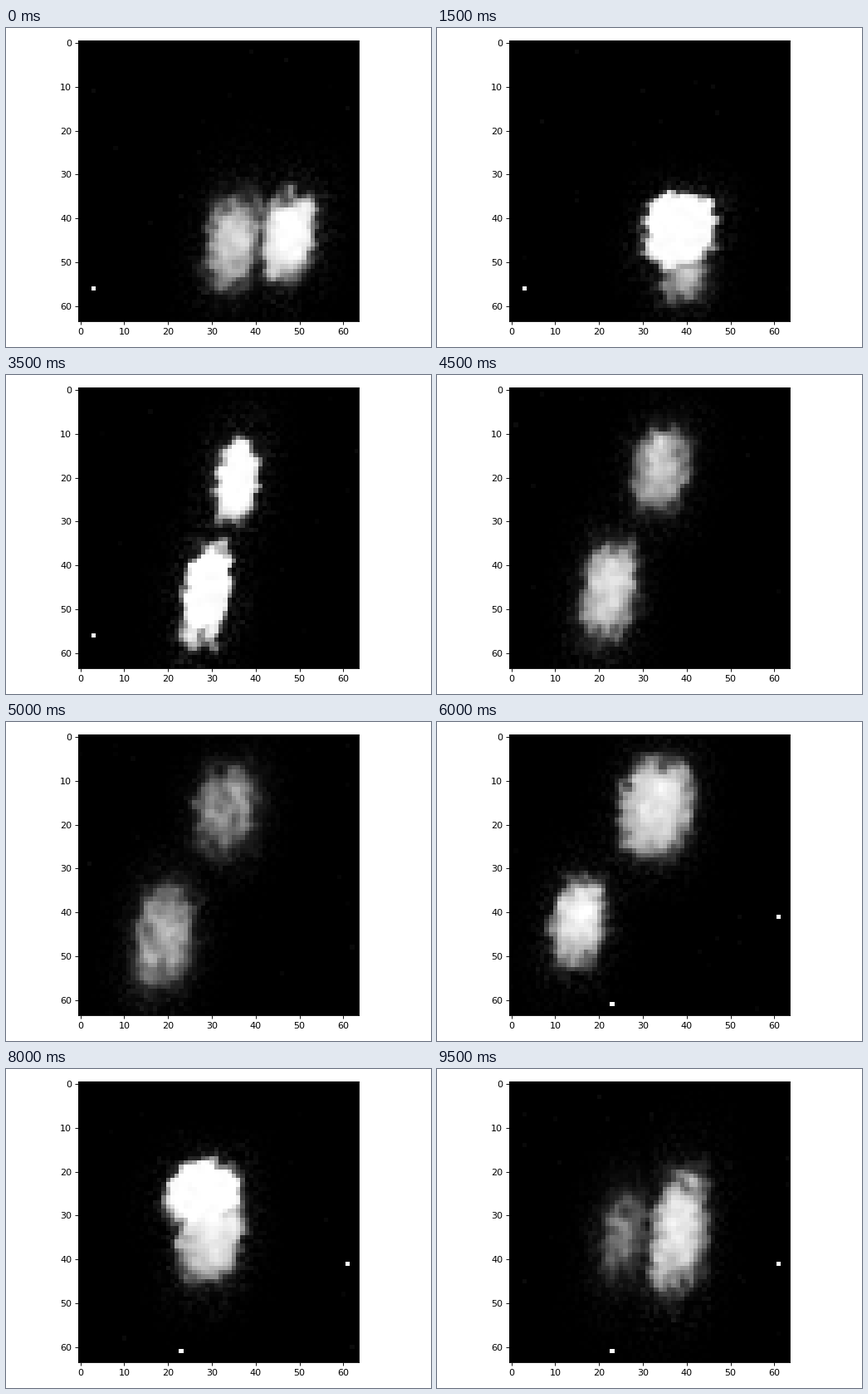
Recreate the animation shown at these times as a matplotlib script. Size 512 by 384 pixels, loop 10000 ms.

```python
import numpy as np
import matplotlib.pyplot as plt
from matplotlib.animation import FuncAnimation

N, FRAMES, INTERVAL, DPI = 64, 20, 500, 80
SLANT = .12
ROWS, COLS = np.mgrid[0:N, 0:N].astype(float)

# Key poses of the two drifting glyphs: x, y, radius x, radius y, level
KEYS = [0, 3, 7, 10, 12, 16, 19]
UPPER = np.array([(35, 45.5, 5.5, 10, .78), (38.5, 43, 8.2, 8.7, 1.15), (35.5, 21, 4.8, 9, 1.12),
                  (33.5, 17, 6.5, 9, .52), (33, 16.5, 8, 11, .84), (28, 25.5, 8.5, 8, 1.1),
                  (25.5, 35, 4.5, 8.5, .45)])
LOWER = np.array([(47.5, 44.5, 6.3, 10, .95), (39.5, 54, 5, 5, .65), (28.7, 47, 5.2, 11, 1.15),
                  (19, 46, 6.3, 11, .62), (15.5, 42.5, 6, 9.5, .88), (30, 35, 7, 10.5, .88),
                  (38, 34.5, 6.3, 13, .82)])

# Lit single cells: row, column, first frame, last frame
DOTS = [(56, 3, 0, 8), (61, 23, 11, 19), (41, 61, 11, 19)]


def smooth_noise(rng):
    """Unit-variance noise that varies over about two cells."""
    noise = rng.normal(size=(N, N))
    for axis in (0, 1):
        noise = (2 * noise + np.roll(noise, 1, axis) + np.roll(noise, -1, axis)) / 4
    return noise / noise.std()


def glyph(poses, frame, wobble):
    """Return a soft slanted blob and the wide halo around it."""
    x, y, rx, ry, level = (np.interp(frame, KEYS, column) for column in poses.T)
    dy = (ROWS - y) / ry
    dx = (COLS - x + SLANT * (ROWS - y)) / rx
    radius = (np.abs(dx) ** 2.5 + np.abs(dy) ** 2.5) ** .4
    distance = (radius - 1) * min(rx, ry) + .5 * wobble
    width = .6 + 1.2 * (1 - level)
    body, halo = (1 / (1 + np.exp(np.clip(distance / w, -40, 40))) for w in (width, 2.2))
    shade = 1.08 - .2 * np.minimum(radius, 1.3) ** 2 - .13 * np.clip(dy, -1.3, 1.3)
    return level * shade * body, halo


def picture(frame):
    rng = np.random.default_rng(40 + frame)
    wobble, grain = smooth_noise(rng), smooth_noise(rng)
    (upper, halo_a), (lower, halo_b) = (glyph(p, frame, wobble) for p in (UPPER, LOWER))
    img = np.clip(np.maximum(upper, lower), 0, 1)
    img *= 1 + .22 * (1.05 - img) * grain
    img = np.maximum(img, .4 * np.maximum(halo_a, halo_b) * rng.random((N, N)) ** 2)
    specks = rng.random((N, N)) < .004
    img = np.maximum(img, specks * rng.uniform(.01, .05, (N, N)))
    for row, col, first, last in DOTS:
        if first <= frame <= last:
            img[row, col] = 1
    return np.clip(img, 0, 1)


fig = plt.figure(figsize=(512 / DPI, 384 / DPI), dpi=DPI, facecolor="white")
ax = fig.add_axes([0, .08, 1, .88])
image = ax.imshow(picture(0), cmap="gray", vmin=0, vmax=1, interpolation="nearest")


def update(frame):
    image.set_data(picture(frame))
    return [image]


anim = FuncAnimation(fig, update, frames=FRAMES, interval=INTERVAL, repeat=True, repeat_delay=0)
plt.show()
```
